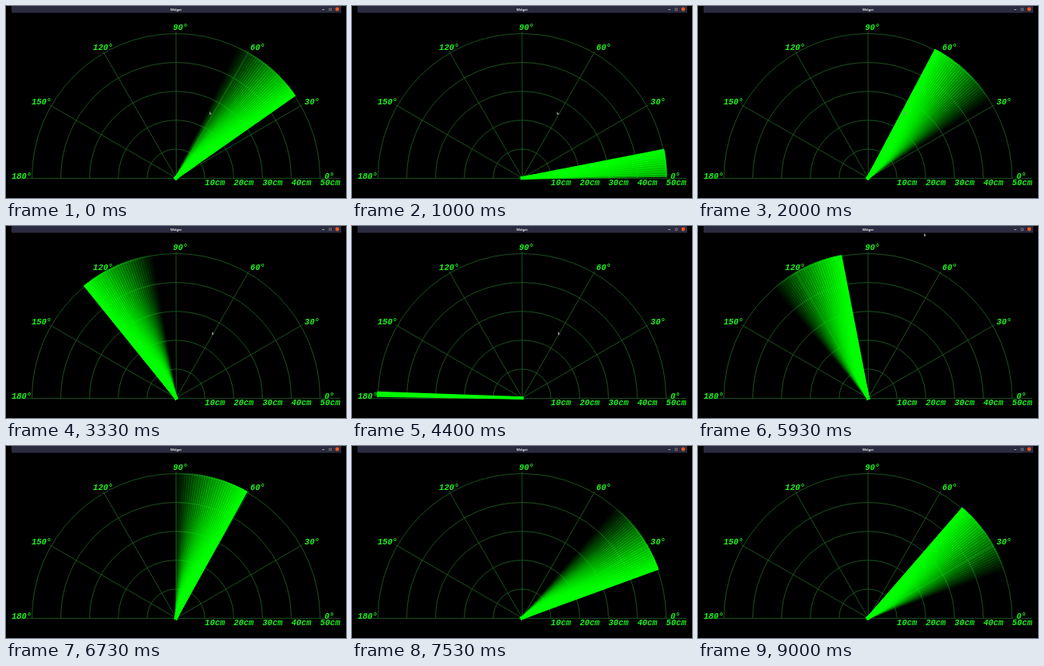
An HTML page with a canvas that plays this animation: 426x240 px, repeating every 9.07 s.

```html
<!DOCTYPE html>
<html lang="en">
<head>
<meta charset="utf-8">
<title>Radar sweep</title>
<style>
html, body { margin: 0; width: 100%; height: 100%; overflow: hidden; background: #000; }
canvas { display: block; width: 100%; height: 100%; }
</style>
</head>
<body>
<canvas id="stage" width="426" height="240"></canvas>
<script>
const ctx = document.getElementById('stage').getContext('2d');
const CX = 213, CY = 215, RING = 36.1, REACH = 180;
const FRAME = 1000 / 15, FRAMES = 136, LOOP = 9070;

// The beam swings 0° - 180° - 0°, resting briefly at 0°.
const PERIOD = 7246, TURN = 732, REST = 46, SPEED = 0.0505;
const TRAIL = 30;

const clamp = (v, lo, hi) => Math.min(hi, Math.max(lo, v));

function polar(deg, r) {
  const a = deg * Math.PI / 180;
  return [CX + r * Math.cos(a), CY - r * Math.sin(a)];
}

function line(x1, y1, x2, y2) {
  ctx.beginPath();
  ctx.moveTo(x1, y1);
  ctx.lineTo(x2, y2);
  ctx.stroke();
}

function titleBar() {
  ctx.fillStyle = '#2b2b40';
  ctx.fillRect(7, 0, 413, 8.5);
  ctx.fillStyle = '#e8e8e8';
  ctx.font = 'bold 4px "Open Sans", sans-serif';
  ctx.textAlign = 'center';
  ctx.fillText('Widget', CX, 5.6);
  ctx.fillStyle = '#b0b0b0';
  ctx.fillRect(396, 4, 3, 0.8);
  ctx.strokeStyle = '#909090';
  ctx.lineWidth = 0.7;
  ctx.strokeRect(405, 3, 2.4, 2.4);
  ctx.fillStyle = '#e95420';
  ctx.beginPath();
  ctx.arc(415, 4, 2.4, 0, 7);
  ctx.fill();
}

function grid() {
  ctx.strokeStyle = '#1f5a22';
  ctx.lineWidth = 0.9;
  ctx.lineCap = 'butt';
  for (let i = 1; i <= 5; i++) {
    ctx.beginPath();
    ctx.arc(CX, CY, RING * i, Math.PI, 0);
    ctx.stroke();
  }
  for (let a = 30; a < 180; a += 30) line(CX + 0.3, CY, ...polar(a, 183));
  line(8, CY + 0.4, 419, CY + 0.4);
}

function labels() {
  ctx.fillStyle = '#1ef01e';
  ctx.font = 'italic bold 10.5px "Liberation Mono", monospace';
  ctx.textAlign = 'left';
  for (let a = 0; a <= 180; a += 30) {
    const [x, y] = polar(a, 186);
    // labels on the left half slide outwards to clear the ring
    const shift = 20 * clamp((a - 60) / 90, 0, 1) ** 1.5;
    ctx.fillText(a + '°', x - shift, y + 1);
  }
  for (let i = 1; i <= 5; i++) ctx.fillText(i * 10 + 'cm', CX + RING * i, 223.5);
}

function sweep(t) {
  const phase = (t - TURN + PERIOD) % PERIOD;
  const rising = phase < PERIOD / 2;
  const fromTurn = rising ? phase : PERIOD - phase;
  const lead = Math.round(clamp((fromTurn - REST) * SPEED, 0, 180));
  const back = rising ? -1 : 1;
  ctx.lineWidth = 3.7;
  ctx.lineCap = 'square';
  for (let i = TRAIL - 1; i >= 0; i--) {
    const a = lead + back * i;
    if (i && (a <= 0 || a >= 180)) continue;
    ctx.strokeStyle = `rgba(0,255,0,${1 - i / TRAIL})`;
    line(CX, CY, ...polar(a, REACH));
  }
}

// Rests over the dial, then glides up and off the stage.
function pointer(t) {
  const leave = Math.max(0, (t - 5500) / 430);
  const x = 255 + Math.min(3, t / 600) + 25 * leave;
  const y = 132 - 122 * leave;
  ctx.fillStyle = '#8c8c8c';
  ctx.beginPath();
  ctx.moveTo(x, y);
  ctx.lineTo(x + 3.2, y + 3.2);
  ctx.lineTo(x + 1.6, y + 3.3);
  ctx.lineTo(x, y + 4.6);
  ctx.fill();
}

function draw(now) {
  const n = Math.min(FRAMES - 1, Math.floor((now % LOOP + 5) / FRAME));
  const t = n * FRAME;
  ctx.fillStyle = '#000';
  ctx.fillRect(0, 0, 426, 240);
  titleBar();
  grid();
  sweep(t);
  labels();
  pointer(t);
}

let start = null;
function tick(now) {
  if (start === null) start = now;
  draw(now - start);
  requestAnimationFrame(tick);
}
draw(0);
requestAnimationFrame(tick);
</script>
</body>
</html>
```
